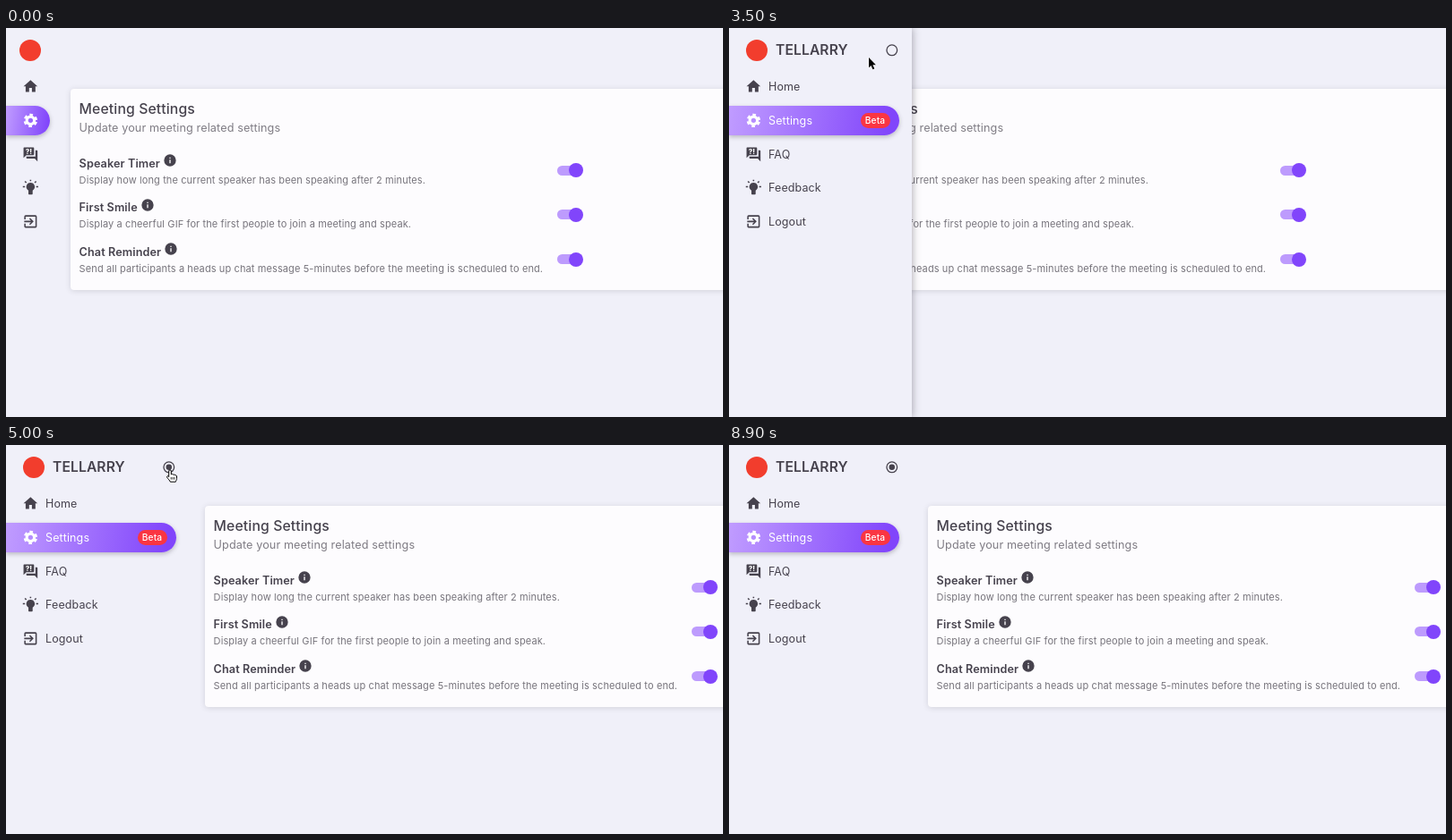
Write an HTML page that moves like this. It is 800 px wide and 435 px high and loops after 9000 ms.

```html
<!DOCTYPE html>
<html lang="en">
<head>
<meta charset="utf-8">
<title>Meeting settings</title>
<style>
  html, body { margin: 0; width: 100%; height: 100%; overflow: hidden; }
  body { position: relative; background: #f0f0f9; color: #46424d; font: 12.5px Inter, sans-serif; letter-spacing: .00938em; white-space: nowrap; }
  body * { position: absolute; box-sizing: border-box; }
  svg { overflow: visible; fill: currentColor; }
  svg * { position: static; }

  #card { left: calc(72px + 150px * var(--slide)); top: 68px; width: 900px; height: 225px; border-radius: 4px; background: #fdfcfe; font-size: 12.62px; box-shadow: 0 1px 6px rgba(58, 53, 65, .16); }
  #card > * { left: 9.6px; line-height: 20px; }
  .title { top: 13px; font-size: 15.75px; font-weight: 500; letter-spacing: .0075em; }
  .subtitle { top: 34px; color: #7f7c84; }
  .row b { font-weight: 600; }
  .row span { top: 18px; font-size: 10.99px; letter-spacing: .01071em; color: #77747c; }
  .row svg { left: 100%; top: -1.6px; margin-left: 3.2px; width: 16px; height: 16px; }
  .track { left: 533.4px; top: 12px; width: 26.6px; height: 11px; border-radius: 6px; background: #bd9bfd; }
  .track i { left: 13.3px; top: -2.5px; width: 16px; height: 16px; border-radius: 50%; background: #8145fb; }

  #side { left: 0; top: 0; width: calc(56px + 148px * var(--open)); height: 100%; overflow: hidden; background: #f0f0f9; box-shadow: 0 0 9px rgba(40, 36, 50, calc(.42 * var(--open) * (1 - var(--slide)))); }
  #logo { left: calc(15px + 4px * var(--open)); top: 13px; width: 24px; height: 24px; border-radius: 50%; background: #f23d2d; }
  #brand { left: calc(39px + 13px * var(--open)); top: 14px; line-height: 21px; font-size: 15.62px; font-weight: 600; letter-spacing: .0075em; opacity: var(--open); }
  #radio { left: calc(71.2px + 103px * var(--open)); top: 16.6px; width: 15.6px; height: 15.6px; opacity: var(--open); }
  .item { left: 0; width: calc(49px + 140.5px * var(--open)); height: 33px; line-height: 33px; border-radius: 0 17px 17px 0; }
  .item.hover { background: #e6e6ee; }
  .item.active { color: #fff; background: linear-gradient(98deg, #c09cff, #8145fb 94%); box-shadow: 0 2px 5px rgba(58, 53, 65, .3); }
  .item > svg { left: 17.6px; top: 7.1px; width: 18.74px; height: 18.74px; }
  .item span { left: calc(36px + 8px * var(--open)); right: 13px; overflow: hidden; text-overflow: ellipsis; opacity: var(--open); }
  .active span { right: 50px; }
  .item em { right: 10px; top: 8.3px; width: 33px; height: 16.4px; border-radius: 9px; background: #fa3542; font: 500 10.2px/16.4px Inter, sans-serif; text-align: center; opacity: var(--open); }
  #cursor { left: 0; top: 0; width: 1px; height: 1px; }
</style>
</head>
<body>
<div id="card">
  <div class="title">Meeting Settings</div>
  <div class="subtitle">Update your meeting related settings</div>
</div>
<div id="side">
  <div id="logo"></div>
  <div id="brand">TELLARRY</div>
  <svg id="radio" viewBox="0 0 24 24"><circle cx="12" cy="12" r="9" fill="none" stroke="currentColor" stroke-width="2"/><circle id="dot" cx="12" cy="12" r="5"/></svg>
</div>
<svg id="cursor">
  <path id="arrow" d="M0 0v11.3l2.5-2.3 1.9 4.2 1.9-.8-1.9-4.1h3.5z" fill="#000" stroke="#fff" stroke-width="1" paint-order="stroke"/>
  <g id="hand" fill="#fff" stroke="#000" stroke-linejoin="round">
    <path d="M-1.3 1c0-1.6 2.6-1.6 2.6 0v4c.6-.9 2.2-.7 2.4.4.7-.7 2-.4 2.1.6.8-.4 1.7 0 1.7 1v2.5c0 2-1 2.2-1.2 3.7h-6c-.4-1.6-2.6-3.2-3.6-5.1-.6-1.3.9-1.9 1.6-1l.4.5z"/>
    <path d="M1.2 8v2.6M3.1 8v2.6M5 8v2.6" stroke-width=".8"/>
  </g>
</svg>
<script>
const $ = id => document.getElementById(id);
const ROW_TOP = 49.4, ROW_STEP = 37.55, ROW_HEIGHT = 33;

const infoIcon = '<path d="M12 2a10 10 0 1 0 0 20 10 10 0 0 0 0-20zm1 15h-2v-6h2zm0-8h-2V7h2z"/>';
const svg = content => `<svg viewBox="0 0 24 24">${content}</svg>`;

const settings = [
  ['Speaker Timer', 'Display how long the current speaker has been speaking after 2 minutes.'],
  ['First Smile', 'Display a cheerful GIF for the first people to join a meeting and speak.'],
  ['Chat Reminder', 'Send all participants a heads up chat message 5-minutes before the meeting is scheduled to end.'],
];
settings.forEach(([label, text], i) => $('card').insertAdjacentHTML('beforeend',
  `<div class="row" style="top:${73.5 + 49.75 * i}px"><b>${label}${svg(infoIcon)}</b><span>${text}</span><div class="track"><i></i></div></div>`));

const menu = [
  ['Home', '<path d="M10 20v-6h4v6h5v-8h3L12 3 2 12h3v8z"/>'],
  ['Settings', `<g fill="none" stroke="currentColor"><circle cx="12" cy="12" r="5.4" stroke-width="4"/>
    <circle cx="12" cy="12" r="8.2" stroke-width="3.4" stroke-dasharray="4.6 3.987" stroke-dashoffset="-1.99"/></g>`],
  ['FAQ', `<path d="M21 6h-2v9H6v2q0 1 1 1h11l4 4V7q0-1-1-1zm-4 6V3q0-1-1-1H3Q2 2 2 3v14l4-4h10q1 0 1-1z"/>
    <text x="9.5" y="11" font-size="10" font-weight="800" text-anchor="middle" fill="#fff">?!</text>`],
  ['Feedback', `<path d="M12 5a6 6 0 0 0-3 11.2V21q0 1 1 1h4q1 0 1-1v-4.8A6 6 0 0 0 12 5z"/>
    <path d="M1 11h3M20 11h3M4 3.2l2 2M20 3.2l-2 2M12 1v2" stroke="currentColor" stroke-width="2"/>`],
  ['Logout', `<path d="M10.1 15.6 11.5 17l5-5-5-5-1.4 1.4 2.6 2.6H3v2h9.7z"/>
    <path d="M4 9V5q0-1 1-1h14q1 0 1 1v14q0 1-1 1H5q-1 0-1-1v-4" fill="none" stroke="currentColor" stroke-width="2"/>`],
];
menu.forEach(([label, icon], i) => $('side').insertAdjacentHTML('beforeend',
  `<div class="item${i === 1 ? ' active' : ''}" style="top:${ROW_TOP + ROW_STEP * i}px">${svg(icon)}<span>${label}</span>${i === 1 ? '<em>Beta</em>' : ''}</div>`));
const items = [...document.querySelectorAll('.item')];

// Cursor hotspot: time, x, y
const path = [
  [400, 320, 423], [500, 314, 134], [800, 314, 134], [1250, 34, 68], [1800, 35, 69],
  [2500, 48, 150], [2800, 54, 155], [3500, 156, 33], [4200, 183, 28], [5100, 183, 28],
  [6100, 440, 292], [6300, 440, 292], [6500, 440, 286], [7800, 440, 286], [8300, 420, 440],
];

function ease(t, from, to) {
  const x = Math.min(1, Math.max(0, (t - from) / (to - from)));
  return x * x * (3 - 2 * x);
}

function cursorAt(t) {
  const next = path.findIndex(key => key[0] > t);
  if (next < 1) return null;
  const [t0, x0, y0] = path[next - 1], [t1, x1, y1] = path[next];
  const k = ease(t, t0, t1);
  return [x0 + (x1 - x0) * k, y0 + (y1 - y0) * k];
}

function render(t) {
  const open = ease(t, 1240, 1540);
  const root = document.documentElement.style;
  root.setProperty('--open', open);
  root.setProperty('--slide', ease(t, 4560, 4860));
  $('dot').style.display = t >= 4600 ? '' : 'none';

  const pos = cursorAt(t);
  const [x, y] = pos || [-99, -99];
  const row = (y - ROW_TOP) / ROW_STEP;
  const inRow = x >= 0 && x < 49 + 140.5 * open && row >= 0 && row % 1 < ROW_HEIGHT / ROW_STEP;
  const hovered = inRow ? Math.floor(row) : -1;
  items.forEach((item, i) => item.classList.toggle('hover', i === hovered));

  const pointing = !!items[hovered] || Math.hypot(x - 182, y - 24.4) < 12;
  $('cursor').style.display = pos ? '' : 'none';
  $('cursor').style.transform = `translate(${x}px, ${y}px)`;
  $('hand').style.display = pointing ? '' : 'none';
  $('arrow').style.display = pointing ? 'none' : '';
}

// The picture advances ten times a second
function tick() {
  render(Math.floor(performance.now() % 9000 / 100) * 100);
  requestAnimationFrame(tick);
}
tick();
</script>
</body>
</html>
```
